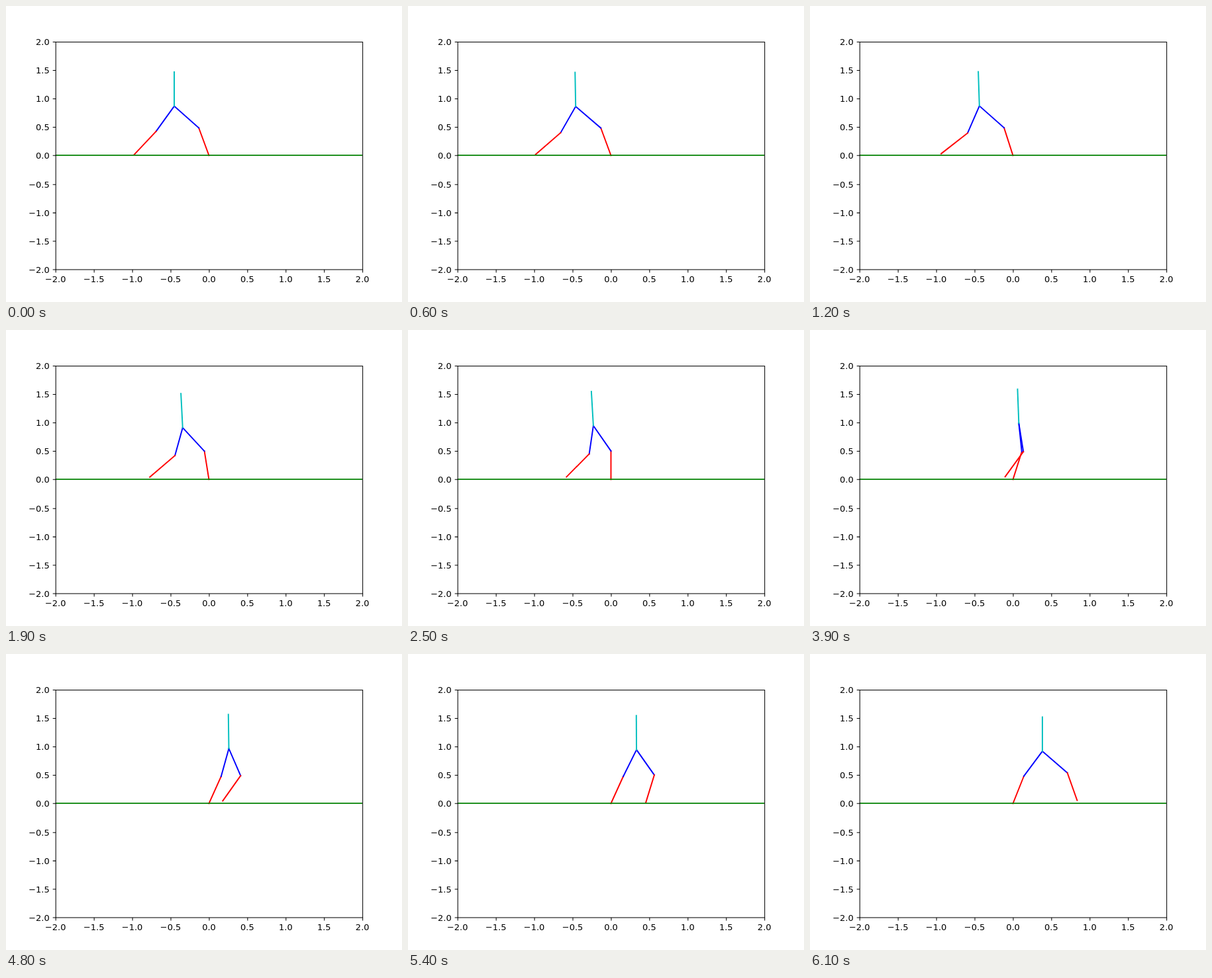
Recreate the animation shown at these times as an HTML page. Size 598 px wide and 448 px high, loop 6200 ms.

```html
<!DOCTYPE html>
<html lang="en">
<head>
<meta charset="utf-8">
<title>Walking step</title>
<style>
  html, body { margin: 0; width: 100%; height: 100%; overflow: hidden; background: #fff; }
  svg { display: block; width: 598px; height: 448px; }
  text { font: 13.89px "DejaVu Sans", sans-serif; fill: #000; }
  .axis { fill: none; stroke: #000; stroke-width: 1.11; }
  .limb { stroke-width: 2.08; stroke-linecap: square; }
</style>
</head>
<body>
<svg id="plot" viewBox="0 0 640 480" preserveAspectRatio="none"></svg>
<script>
const LOOP = 6200, STEP = 100;
const LEFT = 80, RIGHT = 576, TOP = 57.6, BOTTOM = 427.2;
const toX = x => LEFT + (x + 2) / 4 * (RIGHT - LEFT);
const toY = y => BOTTOM - (y + 2) / 4 * (BOTTOM - TOP);
const snap = v => Math.round(v) + 0.5;

const plot = document.getElementById('plot');

function add(tag, attrs, text = '') {
  const el = document.createElementNS('http://www.w3.org/2000/svg', tag);
  for (const key in attrs) el.setAttribute(key, attrs[key]);
  el.textContent = text;
  return plot.appendChild(el);
}

const limb = color => add('line', { class: 'limb', stroke: color });

function place(line, a, b) {
  line.setAttribute('x1', toX(a[0]));
  line.setAttribute('y1', toY(a[1]));
  line.setAttribute('x2', toX(b[0]));
  line.setAttribute('y2', toY(b[1]));
}

const parts = {
  stanceShank: limb('#f00'),
  stanceThigh: limb('#00f'),
  swingThigh: limb('#00f'),
  swingShank: limb('#f00'),
  torso: limb('#00bfbf')
};

// Ground, on whole pixel rows
const groundY = Math.round(toY(0));
add('path', { d: `M${LEFT} ${groundY}H${RIGHT}`, stroke: '#008000', 'stroke-width': 2.08 });

// Axes with ticks and labels
const left = snap(LEFT), right = snap(RIGHT), top_ = snap(TOP), bottom = snap(BOTTOM);
add('rect', { class: 'axis', x: left, y: top_, width: right - left, height: bottom - top_ });
for (let v = -2; v <= 2; v += 0.5) {
  const x = snap(toX(v)), y = snap(toY(v));
  const label = v.toFixed(1).replace('-', '\u2212');
  add('path', { class: 'axis', d: `M${x} ${bottom}v4.86M${left} ${y}h-4.86` });
  add('text', { x: toX(v), y: 447.8, 'text-anchor': 'middle' }, label);
  add('text', { x: 70.3, y: y + 5, 'text-anchor': 'end' }, label);
}

// Limb angles from the vertical, in degrees, at the key times
const times = [0, 1.2, 2.5, 3.3, 3.9, 4.8, 6.1];
const angles = {
  stanceShank: [-15.3, -13.4, 0, 7.9, 13.3, 18.5, 16.5],
  stanceThigh: [-39.9, -40, -27.3, -15, -4.4, 11.6, 28.9],
  torso: [0, -1.4, -2.5, -2.1, -1.6, -0.6, 0],
  swingThigh: [-28.1, -17.9, -6.2, 0.8, 6.8, 17.9, 40.6],
  swingShank: [-34.9, -43.6, -36.4, -30.4, -28.4, -27.8, 14.8]
};

// Smooth curve through the keys, with relaxed ends
function curve(values) {
  const last = times.length - 1;
  const span = i => times[i + 1] - times[i];
  const rate = i => (values[i + 1] - values[i]) / span(i);
  const slope = values.map((_, i) => i > 0 && i < last
    ? (rate(i - 1) * span(i) + rate(i) * span(i - 1)) / (span(i - 1) + span(i))
    : 0);
  slope[0] = 1.5 * rate(0) - 0.5 * slope[1];
  slope[last] = 1.5 * rate(last - 1) - 0.5 * slope[last - 1];
  return t => {
    let i = 0;
    while (i < last - 1 && t > times[i + 1]) i++;
    const h = span(i), u = (t - times[i]) / h, w = 1 - u;
    return w * w * ((1 + 2 * u) * values[i] + u * h * slope[i])
      + u * u * ((1 + 2 * w) * values[i + 1] - w * h * slope[i + 1]);
  };
}

const motion = {};
for (const name in angles) motion[name] = curve(angles[name]);

function pose(t) {
  const draw = (name, from, length) => {
    const a = motion[name](t) * Math.PI / 180;
    const to = [from[0] + Math.abs(length) * Math.sin(a), from[1] + length * Math.cos(a)];
    place(parts[name], from, to);
    return to;
  };
  const knee = draw('stanceShank', [0, 0], 0.5);
  const hip = draw('stanceThigh', knee, 0.5);
  draw('torso', hip, 0.6);
  const swingKnee = draw('swingThigh', hip, -0.5);
  draw('swingShank', swingKnee, -0.5);
}

const start = performance.now();
function tick() {
  const elapsed = (performance.now() - start) % LOOP;
  pose(Math.floor(elapsed / STEP) * STEP / 1000);
  requestAnimationFrame(tick);
}
tick();
</script>
</body>
</html>
```
